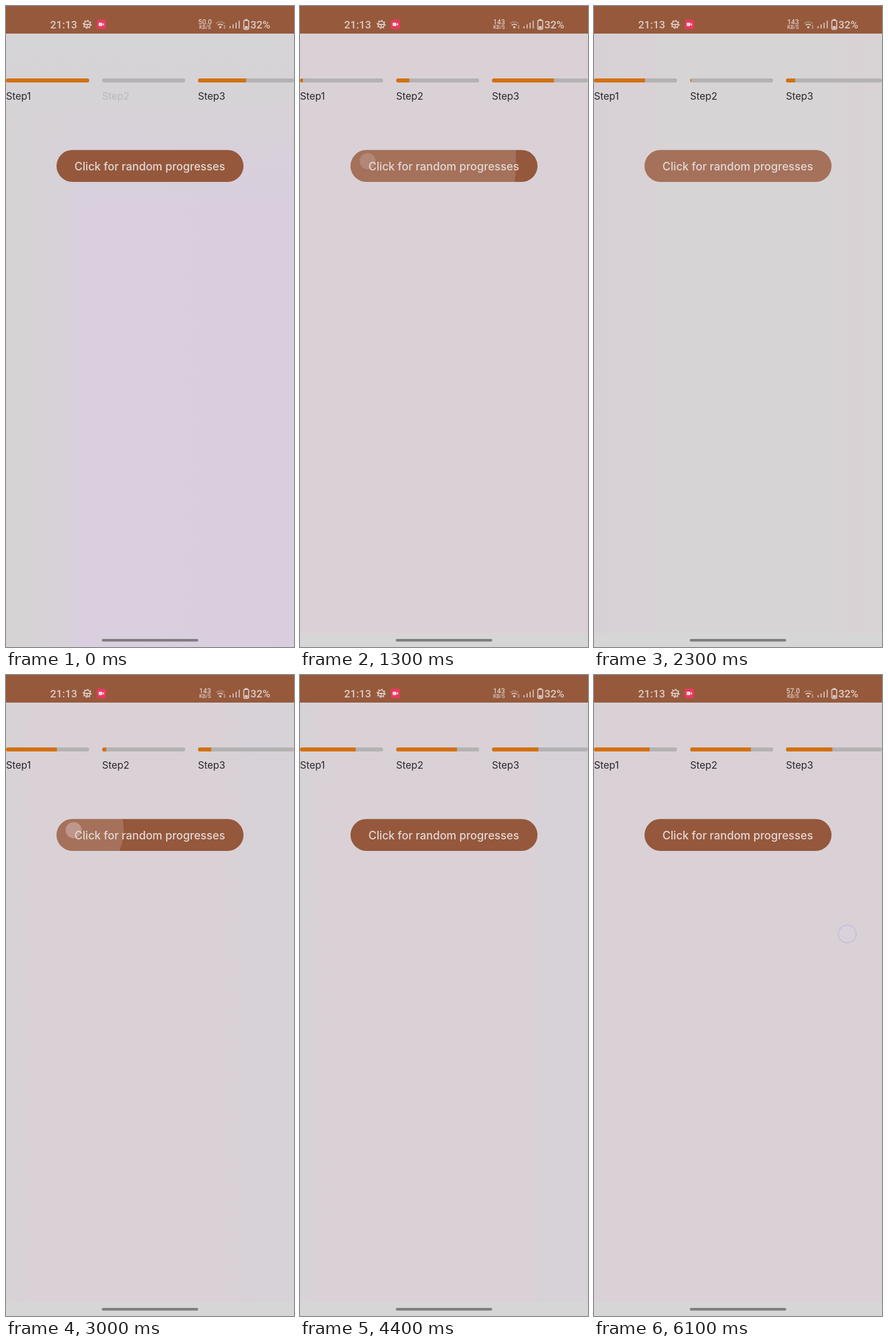
Animation, 502 px wide and 1115 px high, one loop 6.2 s. Source, as an HTML page:

```html
<!DOCTYPE html>
<html lang="en">
<head>
<meta charset="utf-8">
<style>
html, body { margin: 0; height: 100%; overflow: hidden; background: #d8d2d6; }
svg { display: block; width: 502px; height: 1115px; }
text { font-family: Inter, "Open Sans", sans-serif; }
.status text { font-family: Roboto, sans-serif; font-weight: 500; fill: #dccbc4; }
.status .rate { font-size: 12px; text-anchor: middle; }
.icon { fill: none; stroke: #dccbc4; stroke-width: 1.8; }
</style>
</head>
<body>
<svg viewBox="0 0 502 1115">
  <defs>
    <clipPath id="pill"><rect x="88" y="250.5" width="326" height="55.5" rx="27.75"/></clipPath>
    <linearGradient id="lavender">
      <stop offset="0" stop-color="#d5d3d2"/><stop offset=".06" stop-color="#d6d3d4"/>
      <stop offset=".2" stop-color="#d7d1d9"/><stop offset=".26" stop-color="#d9cfde"/>
      <stop offset="1" stop-color="#d9cedd"/>
    </linearGradient>
    <linearGradient id="pink">
      <stop offset="0" stop-color="#d9d1d6"/><stop offset="1" stop-color="#d9d1d6"/>
    </linearGradient>
    <linearGradient id="gray">
      <stop offset="0" stop-color="#d7d1d7"/><stop offset=".18" stop-color="#d9d1d5"/>
      <stop offset=".25" stop-color="#d7d4d5"/><stop offset=".82" stop-color="#d7d4d5"/>
      <stop offset=".9" stop-color="#d9d2d5"/><stop offset="1" stop-color="#d8d3d5"/>
    </linearGradient>
    <linearGradient id="cool">
      <stop offset="0" stop-color="#d6d3d6"/><stop offset=".08" stop-color="#d9d1d6"/>
      <stop offset=".8" stop-color="#d9d1d6"/><stop offset=".85" stop-color="#d6d2d8"/>
      <stop offset="1" stop-color="#d6d2d8"/>
    </linearGradient>
    <linearGradient id="topFade" x2="0" y2="1">
      <stop offset="0" stop-color="#d5d4d6"/><stop offset=".35" stop-color="#d6d3d6"/>
      <stop offset="1" stop-color="#d7d2d8" stop-opacity="0"/>
    </linearGradient>
  </defs>

  <rect id="page" width="502" height="1115"/>
  <rect id="haze" y="48" width="502" height="300" fill="url(#topFade)"/>
  <rect id="foot" y="1091" width="502" height="24" fill="#d6d6d7"/>
  <rect x="167" y="1101" width="168" height="4.5" rx="2.2" fill="#7f7c80"/>

  <rect width="502" height="48" fill="#96593c"/>
  <g class="status">
    <text x="77" y="39" font-size="18.5">21:13</text>
    <circle class="icon" cx="141.5" cy="32" r="5.6"/>
    <circle class="icon" cx="141.5" cy="32" r="7.1" stroke-width="1.6" stroke-dasharray="2.2 3.376"/>
    <path class="icon" d="M136 32h11M141.5 32v5" stroke-width="1.5"/>
    <rect x="158" y="23.5" width="16.5" height="17" rx="3.5" fill="#e63a5f"/>
    <rect x="161.5" y="29" width="6.5" height="6" rx="1.3" fill="#f3dcdc"/>
    <path d="M168 32l3-2.5v5z" fill="#f3dcdc"/>
    <text id="rate" class="rate" x="347" y="32"></text>
    <text x="347" y="40" font-size="9" text-anchor="middle">KB/S</text>
    <path class="icon" d="M366 30.5q7.500-6 15 0" opacity=".4"/>
    <path class="icon" d="M369 33.500q4.500-3.700 9 0"/>
    <circle cx="373.500" cy="37" r="2" fill="#dccbc4"/>
    <path d="M379 35.500l2-2 2 2zM379 37.500l2 2 2-2z" fill="#dccbc4"/>
    <path class="icon" stroke-width="3" d="M390.500 39v-4M395.800 39v-7M401.100 39v-10M406.500 39v-13.500"/>
    <rect class="icon" x="414.500" y="25" width="8.500" height="15.500" rx="2" stroke-width="1.400"/>
    <path d="M416.500 22.800h4.500v2h-4.500zM416.300 35h5v4h-5z" fill="#dccbc4"/>
    <text x="426" y="39" font-size="18.500">32%</text>
  </g>

  <g id="steps"></g>

  <g clip-path="url(#pill)">
    <rect x="88" y="250" width="326" height="57" fill="#95583c"/>
    <circle id="ripple" cx="118" cy="270" fill="#ded0d0"/>
  </g>
  <text x="250.500" y="286" font-size="19.400" font-weight="500" text-anchor="middle" textLength="" fill="#e2d8d5">Click for random progresses</text>
  <circle id="touch" cx="118" cy="270" r="14" fill="#e0d2cf"/>
  <circle id="ring" cx="441.500" cy="450.500" r="15.500" fill="#d9d2da" stroke="#c5c0d4" stroke-width="1.800"/>
</svg>
<script>
const LOOP = 6200, MOVE = 300;
const $ = id => document.getElementById(id);
const clamp = v => Math.max(0, Math.min(1, v));
const ramp = (t, a, b) => clamp((t - a) / (b - a));
const ease = p => p * p * (3 - 2 * p);

// Each tap: press time, bar start time, bar lengths reached
const rest = [145, 0, 84];
const taps = [
  { press: 200, start: 150, to: [4, 113, 157] },
  { press: 1120, start: 1000, to: [5, 23, 108] },
  { press: 2000, start: 1950, to: [89, 2, 16] },
  { press: 2950, start: 2950, to: [84, 69, 110] },
  { press: 3890, start: 3950, to: [97, 106, 81] }
];
const backdrops = [[0, 'lavender'], [1000, 'pink'], [1700, 'gray'], [2800, 'cool'], [4900, 'pink']];
const rates = [[0, '50.0'], [1000, '143'], [5000, '57.0']];
const current = (list, t) => list.filter(item => item[0] <= t).pop()[1];

const tracks = [[0, 145], [167.5, 145], [334.5, 167.5]];
$('steps').innerHTML = tracks.map(([x, w], i) => `
  <clipPath id="track${i}"><rect x="${x}" y="126" width="${w}" height="7" rx="3.5"/></clipPath>
  <g clip-path="url(#track${i})">
    <rect x="${x}" y="126" width="${w}" height="7" fill="#b5b2b3"/>
    <rect id="bar${i}" x="${x}" y="126" height="7" fill="#d3700d"/>
  </g>
  <text id="label${i}" x="${x}" y="162.5" font-size="17.2">Step${i + 1}</text>`).join('');

function lengths(t) {
  return taps.reduce((from, tap) => {
    const p = ease(ramp(t, tap.start, tap.start + MOVE));
    return from.map((v, i) => v + (tap.to[i] - v) * p);
  }, rest);
}

function draw(t) {
  const backdrop = current(backdrops, t);
  $('page').setAttribute('fill', `url(#${backdrop})`);
  $('haze').setAttribute('opacity', backdrop === 'lavender' ? 1 : 0);
  $('foot').setAttribute('opacity', backdrop === 'lavender' ? 0 : 1);
  $('rate').textContent = current(rates, t);

  lengths(t).forEach((w, i) => {
    $('bar' + i).setAttribute('width', w);
    $('label' + i).setAttribute('fill', w > 0 ? '#2a2629' : '#bcb8bc');
  });

  const tap = taps.filter(k => k.press - 120 <= t).pop();
  const age = tap ? t - tap.press : 9999;
  $('ripple').setAttribute('r', 20 + 290 * ramp(age, 0, 220));
  $('ripple').setAttribute('opacity', age < 0 ? 0 : 0.21 * (1 - ramp(age, 350, 510)));
  $('touch').setAttribute('opacity', 0.4 * ramp(age, -120, -20) * (1 - ramp(age, 120, 260)));

  const first = ramp(t, 4850, 5000) * (1 - ramp(t, 5100, 5300));
  $('ring').setAttribute('cx', t < 5600 ? 435.5 : 441.5);
  $('ring').setAttribute('opacity', Math.max(first, ramp(t, 5850, 6000)));
}

function frame(now) {
  draw(now % LOOP);
  requestAnimationFrame(frame);
}
draw(0);
requestAnimationFrame(frame);
</script>
</body>
</html>
```
